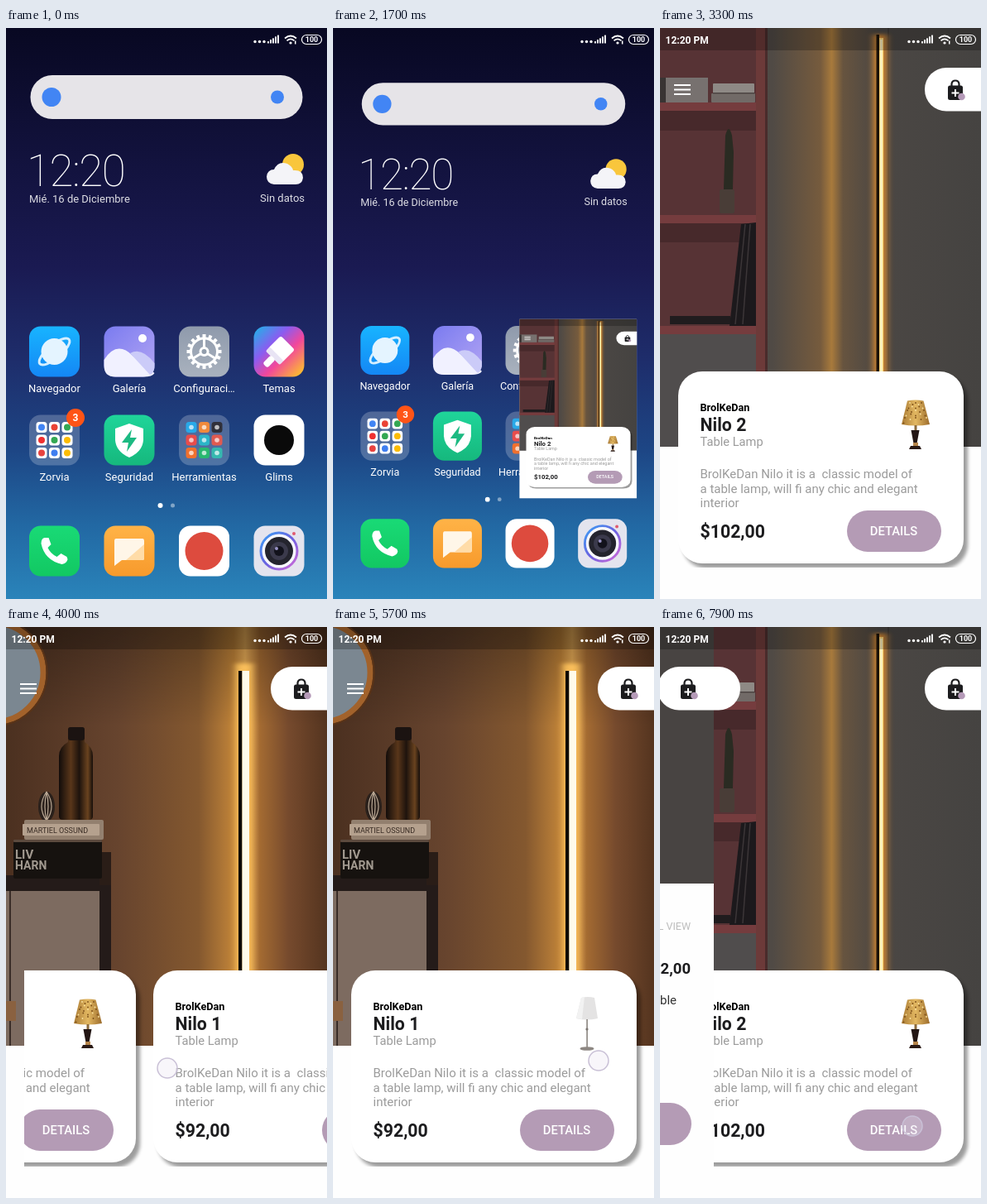
Animation of 388 by 690 pixels, one loop 8000 ms. Source, as an HTML page:

```html
<!DOCTYPE html>
<html lang="es">
<head>
<meta charset="utf-8">
<title>Interior</title>
<style>
html, body { margin: 0; width: 100%; height: 100%; overflow: hidden; background: #0a0a26; }
svg { display: block; width: 100vw; height: 100vh; }
text { font-family: Roboto, "Open Sans", sans-serif; white-space: pre; }
.w { fill: #fff; }
.mid { text-anchor: middle; }
.end { text-anchor: end; }
.b { font-weight: 700; }
.soft { fill: #9b9b9b; }
</style>
</head>
<body>
<svg id="stage" viewBox="0 0 388 690" preserveAspectRatio="none">
<defs>
  <clipPath id="screen"><rect width="388" height="690"/></clipPath>
  <clipPath id="photo"><rect width="388" height="506"/></clipPath>
  <clipPath id="list"><rect x="22" y="415" width="366" height="237"/></clipPath>
  <filter id="blur2" x="-10%" y="-10%" width="120%" height="120%"><feGaussianBlur stdDeviation="2"/></filter>
  <filter id="blur4" x="-400%" width="900%"><feGaussianBlur stdDeviation="4 2"/></filter>
</defs>
<rect width="388" height="690" fill="url(#sky)"/>
<g id="home"></g>
<g id="app" clip-path="url(#screen)">
  <rect width="388" height="690" fill="#fefefe"/>
  <g id="roomA" clip-path="url(#photo)"></g>
  <g id="roomB" clip-path="url(#photo)"></g>
  <path d="M17 69h20M17 74.5h20M17 80h20" stroke="#fff" stroke-width="2"/>
  <g id="bag"></g>
  <g clip-path="url(#list)"><g id="cards"></g></g>
  <g id="detail"></g>
  <rect width="388" height="27" opacity=".24"/>
</g>
<g id="status"></g>
<text id="time" class="w" x="6.5" y="18.5" font-size="12" font-weight="600">12:20 PM</text>
<circle id="touch" r="12" fill="#e8e0f0" fill-opacity=".3" stroke="#c9c0d6" stroke-width="1.5"/>
</svg>
<script>
const $ = id => document.getElementById(id);
const add = (id, html) => $(id).insertAdjacentHTML('beforeend', html);
const rect = (x, y, w, h, fill, r = 0, more = '') =>
  `<rect x="${x}" y="${y}" width="${w}" height="${h}" rx="${r}" fill="${fill}" ${more}/>`;
const dot = (x, y, r, fill, more = '') => `<circle cx="${x}" cy="${y}" r="${r}" fill="${fill}" ${more}/>`;
const path = (d, fill, more = '') => `<path d="${d}" fill="${fill}" ${more}/>`;
const text = (s, x, y, size, cls = 'w', more = '') =>
  `<text x="${x}" y="${y}" font-size="${size}" class="${cls}" ${more}>${s}</text>`;

// Gradients: id, direction, then colour stops as "offset colour"
const grad = (id, dir, ...stops) => {
  const [x, y] = { v: [0, 1], h: [1, 0], d: [1, 1] }[dir];
  add('stage', `<linearGradient id="${id}" x1="0" y1="0" x2="${x}" y2="${y}">` + stops.map(s => {
    const [o, c] = s.split(' ');
    return `<stop offset="${o}" stop-color="${c}"/>`;
  }).join('') + '</linearGradient>');
};
grad('sky', 'v', '0 #080822', '.2 #11113a', '.42 #1a1a52', '.58 #1e2d6b', '.74 #1d4685', '.87 #2268a3', '1 #2a84ba');
grad('blue', 'v', '0 #18b4ff', '1 #1487f5');
grad('lilac', 'd', '0 #7a7bf0', '1 #b3a5f3');
grad('steel', 'v', '0 #8f9aac', '1 #a9b2be');
grad('paint', 'd', '0 #18b8e8', '.35 #8b5cf0', '.6 #f2479b', '1 #ffd21c');
grad('green', 'v', '0 #1fd59a', '1 #16b87d');
grad('call', 'v', '0 #19da76', '1 #12c862');
grad('amber', 'v', '0 #ffb347', '1 #f79a2c');
grad('lens', 'd', '0 #3aa0f5', '.5 #6a62e0', '1 #d66ad8');
grad('wallA', 'h', '0 #464240', '.35 #504a45', '.5 #765b3d', '.535 #a87a3c', '.57 #67543f', '.68 #4b4744', '1 #454341');
grad('wallB', 'h', '0 #4b3020', '.35 #67442e', '.6 #84582f', '.71 #c18439', '.745 #e8ac57', '.79 #a46b32', '.88 #764a2d', '1 #54341f');
grad('shade', 'v', '0 #000', '1 #0000');
grad('gold', 'h', '0 #a97a34', '.5 #e3b862', '1 #9c6c2c');
grad('bottle', 'h', '0 #120c0a', '.35 #59361a', '.6 #1e130d', '.85 #6a431f', '1 #140d0a');

// Home screen
const cols = [58.5, 149, 239.5, 330];
const tile = (i, y, fill, art = '', label = '') =>
  `<g transform="translate(${cols[i]} ${y})">${rect(-30.5, -30.5, 61, 61, fill, 14)}${art}</g>` +
  (label && text(label, cols[i], y + 49, 13, 'w mid'));
const grid = (colors, mini) => colors.map((c, i) =>
  mini(-15.5 + i % 3 * 15.5, -15.5 + Math.floor(i / 3) * 15.5, c)).join('');
const teeth = Array.from({ length: 16 }, (_, i) =>
  `<path d="M0 -21V-17" stroke="#fff" stroke-width="4" transform="rotate(${i * 22.5})"/>`).join('');
const art = {
  planet: `<ellipse rx="23" ry="8" fill="none" stroke="#d5efff" stroke-width="3" transform="rotate(-40)"/>` + dot(0, 0, 16, '#e4f4ff'),
  photo: path('M-30.5 10Q-15 -14 4 5L30.5 26Q28 30.5 17 30.5H-17Q-30.5 30.5 -30.5 17Z', '#f1f1ff') +
    path('M1 2Q15 -6 30.5 14V20Q29 27 25 28Z', '#cbcbf8') + dot(16, -16, 5, '#fff'),
  gear: `<circle r="16" fill="none" stroke="#fff" stroke-width="3"/>` + teeth +
    `<path d="M0 0V-15M0 0L13 8M0 0L-13 8" stroke="#fff" stroke-width="3"/>` + dot(0, 0, 6, '#fff') + dot(0, 0, 3, '#929dac'),
  brush: `<g transform="rotate(45)">${rect(-12, -15, 24, 22, '#fff', 3)}${rect(-12, 4, 24, 7, '#e8e4f4', 2)}${rect(-4, 10, 8, 14, '#fff', 3)}</g>`,
  shield: path('M0 -20L17 -14V0Q16 14 0 21Q-16 14 -17 0V-14Z', '#fff') + path('M3 -13L-9 3H-1L-3 14L9 -3H1Z', '#1cba82'),
  phone: path('M-12 -16Q-16 -15 -16 -9Q-12 11 9 16Q15 15 16 10L15 7L8 3L3 7Q-5 3 -8 -4L-4 -8L-7 -16Z', '#fff'),
  chat: path('M-16 -15H16Q18 -15 18 -12V9Q18 11 16 11H-9L-18 18V-12Q-18 -15 -16 -15Z', '#fff6e8') +
    path('M-4 11L18 -8V9Q18 11 16 11Z', '#ffdca8'),
  camera: dot(0, 0, 22, '#f8f8fc', 'stroke="url(#lens)" stroke-width="3"') + dot(0, 0, 17, '#24242e') +
    dot(0, 0, 11, '#3b3a4c') + dot(0, 0, 6, '#12121c') + dot(-3, -3, 2, '#9a94c8') + dot(18, -21, 2, '#e05a70')
};
const brandDots = ['#4285f4', '#ea4335', '#34a853', '#f03030', '#34a853', '#fbbc05', '#e8433f', '#3f7ef0', '#fbbc05'];
const toolDots = ['#29a9e8', '#f08a3c', '#30303a', '#e84c4c', '#2bb5c8', '#e05a50', '#f0702e', '#28b870', '#36b8b0'];
add('home',
  rect(29.5, 57, 329, 53, '#e6e4e8', 26.5) + dot(55, 83.5, 11.5, '#4285f4') + dot(328, 83.5, 8, '#4285f4') +
  text('12:20', 25, 190.5, 53, 'w', 'font-weight="200" letter-spacing="-1.4"') +
  text('Mié. 16 de Diciembre', 28, 211, 13, 'w', 'opacity=".85"') +
  dot(347, 165, 13, '#f9c63c') +
  path('M324 189Q315 188 315 179.5Q316 171 324 171Q329 160 340 164Q346 167 347 172Q359 171 359 181Q358 189 350 189Z', '#f4f4f8') +
  text('Sin datos', 361, 210, 13, 'w end', 'opacity=".85"') +
  tile(0, 391, 'url(#blue)', art.planet, 'Navegador') +
  tile(1, 391, 'url(#lilac)', art.photo, 'Galería') +
  tile(2, 391, 'url(#steel)', art.gear, 'Configuraci…') +
  tile(3, 391, 'url(#paint)', art.brush, 'Temas') +
  tile(0, 498, '#ffffff38', grid(brandDots, (x, y, c) => rect(x - 6.5, y - 6.5, 13, 13, '#fff', 3.5) + dot(x, y, 4, c)), 'Zorvia') +
  tile(1, 498, 'url(#green)', art.shield, 'Seguridad') +
  tile(2, 498, '#ffffff38', grid(toolDots, (x, y, c) => rect(x - 6.5, y - 6.5, 13, 13, c, 3.5) + dot(x, y, 2.8, '#ffffffb0')), 'Herramientas') +
  tile(3, 498, '#fff', dot(0, 0, 18, '#0a0a0a'), 'Glims') +
  dot(84, 471, 11, '#ff5416') + text('3', 84, 475, 12, 'w mid b') +
  dot(186.5, 577, 3, '#fff') + dot(201.5, 577, 2.5, '#ffffff70') +
  tile(0, 632, 'url(#call)', art.phone) + tile(1, 632, 'url(#amber)', art.chat) +
  tile(2, 632, '#fff', dot(0, 0, 23, '#dd4b3e')) + tile(3, 632, '#e4e4ee', art.camera));

const bars = [0, 1, 2, 3, 4].map(i => rect(316 + i * 3, 16 - i * 1.9, 2, 2.5 + i * 1.9, '#fff', .6)).join('');
add('status', [301, 306.5, 312].map(x => dot(x, 16.5, 1.7, '#fff')).join('') + bars +
  path('M337 12.5Q344 6.5 351 12.5M339.5 15.3Q344 11.4 348.5 15.3', 'none', 'stroke="#fff" stroke-width="1.7"') +
  dot(344, 18, 1.6, '#fff') + rect(349, 15.5, 1.5, 4, '#fff') +
  rect(357.5, 8.5, 24, 11, 'none', 5.5, 'stroke="#fff" stroke-width="1.2"') + text('100', 369.5, 17.3, 9, 'w mid b'));

// Room with shelves
add('roomA',
  rect(0, 0, 388, 506, 'url(#wallA)') + rect(275, 0, 2, 506, '#3a3532', 0, 'opacity=".6"') +
  rect(0, 0, 117, 370, '#573335') + rect(0, 100, 117, 24, '#3c2326', 0, 'opacity=".6"') +
  rect(0, 235, 117, 24, '#3c2326', 0, 'opacity=".6"') + rect(0, 370, 117, 136, '#504d4d') +
  [90, 226, 360].map(y => rect(0, y, 118, 10, '#753c3e')).join('') +
  rect(116, 0, 14, 506, '#6c3a39') + rect(127, 0, 3, 506, '#492b2b') +
  rect(0, 60, 58, 30, '#77716f') + rect(0, 60, 7, 30, '#393433') + rect(64, 67, 50, 12, '#8e8985', 1) +
  rect(62, 79, 53, 11, '#716a67', 1) + rect(64, 78, 50, 1.5, '#4c4543') +
  path('M77 195L79 130Q83 114 87 130L89 150L88 195Z', '#2a2b22') + rect(72, 195, 18, 29, '#493d37', 2) +
  path('M98 237L116 235V360H84Z', '#1c191c') +
  path('M103 237L91 358M109 237L100 358', 'none', 'stroke="#3c3638" stroke-width="1.5"') +
  rect(12, 348, 73, 10, '#201c1e') +
  rect(258, 8, 16, 498, '#ff9d2e', 0, 'filter="url(#blur4)" opacity=".8"') +
  rect(261.5, 8, 3.5, 498, '#1b1209') + rect(265, 12, 5, 494, '#ffd677') + rect(266.2, 14, 2.6, 492, '#fff3c4'));

// Room with cabinet
const stripes = [-6, -2, 2, 6].map(x => path(`M49 199Q${49 + x * 2} 217 49 234`, 'none', 'stroke="#b7a592" stroke-width="1.2"')).join('');
add('roomB',
  rect(0, 0, 388, 506, 'url(#wallB)') + rect(0, 0, 388, 120, 'url(#shade)', 0, 'opacity=".3"') +
  dot(-15, 55, 60, '#7b8791', 'stroke="#a2622b" stroke-width="7"') +
  dot(-15, 55, 64.5, 'none', 'stroke="#5a3317" stroke-width="2"') +
  rect(0, 300, 127, 206, '#241b19') + rect(0, 319, 113, 187, '#7d6b60') + rect(4, 319, 2, 187, '#3a2d28') +
  rect(0, 452, 12, 24, '#8a6140') + rect(113, 272, 14, 40, '#2a1d17') +
  path('M75 124Q75 121 79 121H91Q95 121 95 124V139Q105 145 105 156V229Q105 233 100 233H69Q64 233 64 229V156Q64 145 75 139Z', 'url(#bottle)') +
  rect(75, 121, 20, 16, '#1b1311', 3) +
  `<ellipse cx="49" cy="217" rx="10" ry="18" fill="#2a201b"/>` + stripes +
  rect(22, 233, 96, 24, '#93806f', 2) + rect(20, 238, 93, 14, '#b5a18e', 1) +
  text('MARTIEL OSSUND', 25, 249, 9, '', 'fill="#3a2d25"') +
  rect(9, 257, 107, 47, '#16120f', 2) + rect(9, 257, 107, 3, '#5c4a3e', 1) +
  text('LIV', 11, 280, 15, 'b', 'fill="#a29a90"') + text('HARN', 11, 293, 14, 'b', 'fill="#a29a90"') +
  rect(278, 44, 20, 462, '#ffc35c', 0, 'filter="url(#blur4)" opacity=".9"') +
  rect(281, 53, 4.5, 453, '#0c0805') + rect(285.5, 53, 8.5, 453, '#fffbea'));

const bag = rect(320, 48, 100, 52.5, '#fff', 26) +
  path('M352.5 71V67.5Q353 63.5 357 63.5Q361 63.5 361.5 67.5V71', 'none', 'stroke="#1c1c1e" stroke-width="2.2"') +
  rect(348, 69.5, 18, 17.5, '#1c1c1e', 2.5) +
  path('M357 74V83M352.5 78.5H361.5', 'none', 'stroke="#fff" stroke-width="2"') + dot(364.5, 83, 4.3, '#b59ab8');
add('bag', bag);

// Product cards
const specks = Array.from({ length: 26 }, (_, i) => {
  const row = Math.floor(i / 5), half = 7 + row * 1.5;
  return dot(309 + half * ((i % 5) / 2 - 1), 453 + row * 4.5 + i % 2 * 2, .9, i % 3 ? '#7a4d18' : '#fbe2a0');
}).join('');
const pictures = {
  1: path('M300 448Q308 446 316 448L320 473Q307 476 294 473Z', '#e4e3e3') + path('M300 448L294 473L301 474L304 447Z', '#f2f2f2') +
    rect(306.3, 474, 1.6, 34, '#8b8580') + dot(307, 486, 1.6, '#7a746f') +
    `<ellipse cx="307" cy="509.5" rx="8.5" ry="2.3" fill="#8d8782"/>`,
  2: path('M299 450.5Q309 448.5 318.5 450.5L326 479Q309 482 292 479Z', 'url(#gold)') + specks +
    rect(307.5, 480, 3, 6, '#8b6a3c') + path('M303.5 486H313.5L310.5 502H306.5Z', '#231614') +
    rect(306, 501, 6, 4, '#b6854a') + path('M303 505H314L316 509H301Z', '#2a1a16')
};
const card = (n, price) =>
  rect(27, 421, 345, 232, '#000', 29, 'opacity=".38" filter="url(#blur2)"') + rect(22, 415, 345, 232, '#fff', 29) +
  text('BrolKeDan', 48.5, 463, 12.7, 'b') + text('Nilo ' + n, 48.5, 487, 21.3, 'b', 'fill="#1c1c1e"') +
  text('Table Lamp', 48.5, 505, 14.7, 'soft') +
  ['BrolKeDan Nilo it is a  classic model of', 'a table lamp, will fi any chic and elegant', 'interior']
    .map((s, i) => text(s, 48.5, 544 + i * 17.6, 15, 'soft')).join('') +
  text(price, 48.5, 616, 21.3, 'b', 'fill="#1c1c1e"') +
  rect(226, 583, 114, 50, '#b49bb5', 25) + text('DETAILS', 282.5, 613.3, 14.8, 'w mid', 'font-weight="500"') + pictures[n];
const pitch = 366;
[[2, '$102,00'], [1, '$92,00'], [2, '$102,00']].forEach(([n, price], i) =>
  add('cards', `<g transform="translate(${i * pitch})">${card(n, price)}</g>`));

add('detail',
  rect(0, 0, 388, 690, '#fefefe') + rect(0, 0, 388, 310, '#484442') + bag +
  text('DETAIL VIEW', 360, 365.5, 12.5, 'end', 'fill="#bdbdbd"') +
  text('$102,00', 360, 419, 18.5, 'end b', 'fill="#1c1c1e"') +
  text('A warm light for any table', 343, 456, 15, 'end', 'fill="#333"') +
  rect(226, 575, 135, 51, '#b49bb5', 25.5));

// Motion tables: [ms, value]
const openSteps = [[1600, 0], [1700, .248], [1800, .62], [1900, .88], [2000, .98], [2100, 1]];
const scrollSteps = [[3600, 0], [3700, -20], [3800, -80], [3900, -145], [4000, -210], [4200, -302], [4400, -348], [4700, -366],
  [5700, -366], [5800, -390], [5900, -475], [6000, -575], [6100, -650], [6200, -697], [6300, -720], [6400, -732]];
const detailSteps = [[7700, -388], [7800, -376], [7900, -323], [8000, -240]];
// Each touch: [ms, x, y] points
const touches = [
  [[3600, 345, 528], [3700, 330, 529], [4000, 195, 533]],
  [[5600, 321, 524], [5700, 321, 524], [5800, 297, 524], [5900, 215, 526], [6000, 140, 529]],
  [[7700, 305, 603], [7900, 305, 603]]
];
const at = (steps, t, k = 1) => {
  const i = steps.findIndex(s => s[0] > t);
  if (i < 0) return steps[steps.length - 1][k];
  if (i === 0) return steps[0][k];
  const a = steps[i - 1], b = steps[i];
  return a[k] + (b[k] - a[k]) * (t - a[0]) / (b[0] - a[0]);
};
const move = (id, value) => $(id).setAttribute('transform', value);
const show = (id, on) => { $(id).style.display = on ? '' : 'none'; };

function draw(t) {
  const p = at(openSteps, t);
  const s = 1 - .128 * p;
  move('home', `translate(194 345) scale(${s}) translate(-194 -345)`);
  show('home', p < 1);
  const w = 61 + 327 * p, h = 61 + 629 * p;
  move('app', `translate(${330 - 136 * p - w / 2} ${498 - 153 * p - h / 2}) scale(${w / 388} ${h / 690})`);
  show('app', p > 0);
  show('time', p > .95);

  const x = at(scrollSteps, t);
  move('cards', `translate(${x})`);
  const page = Math.round(-x / pitch);
  show('roomA', page !== 1);
  show('roomB', page === 1);

  const dx = at(detailSteps, t);
  move('detail', `translate(${dx})`);
  show('detail', dx > -388);

  const touch = touches.find(a => t >= a[0][0] && t <= a[a.length - 1][0]);
  show('touch', touch);
  if (touch) move('touch', `translate(${at(touch, t, 1)} ${at(touch, t, 2)})`);
}

const start = performance.now();
function tick() {
  const t = (performance.now() - start) % 8000;
  draw(Math.floor(t / 100) * 100);
  requestAnimationFrame(tick);
}
tick();
</script>
</body>
</html>
```
